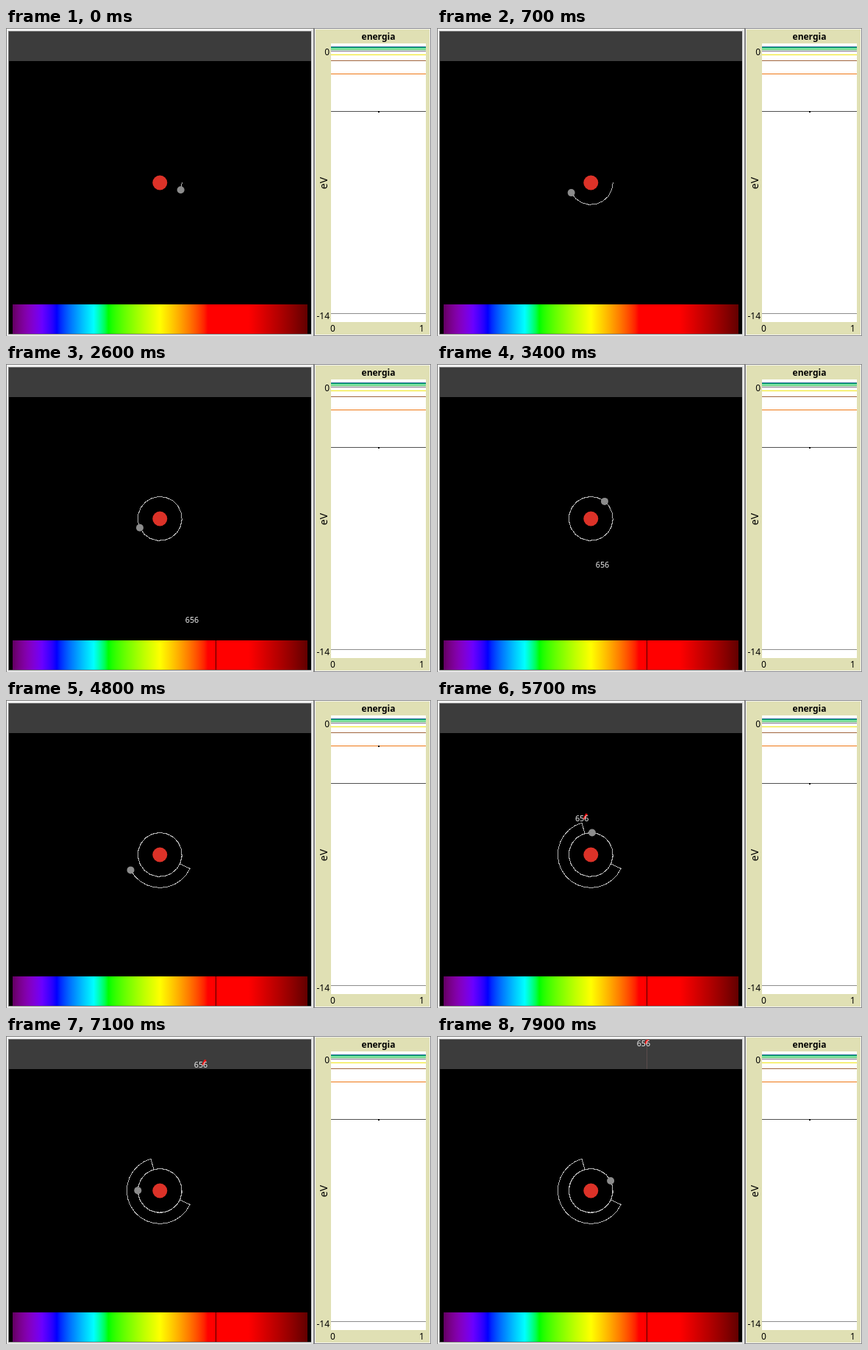
Recreate the animation shown at these times as an HTML page. Size 578x419 px, loop 8 s.

```html
<!DOCTYPE html>
<html lang="it">
<head>
<meta charset="utf-8">
<title>energia</title>
<style>
html, body { margin: 0; width: 100%; height: 100%; overflow: hidden; background: #dcdcdc; }
svg { position: absolute; left: 0; top: 0; display: block; }
text { font-family: "Noto Sans", "Open Sans", sans-serif; font-size: 12px; fill: #000; }
.crisp { shape-rendering: crispEdges; }
#label text { font-size: 10.67px; fill: #f0f0f0; text-anchor: middle; }
</style>
</head>
<body>
<svg width="578" height="419" viewBox="0 0 578 419">
  <defs>
    <linearGradient id="rainbow"></linearGradient>
    <clipPath id="view"><rect x="4" y="5" width="411" height="411"/></clipPath>
  </defs>

  <!-- window frames -->
  <g class="crisp">
    <rect width="578" height="419" fill="#dcdcdc"/>
    <rect width="419" height="1" fill="#828282"/>
    <rect width="1" height="419" fill="#828282"/>
    <rect x="1" y="1" width="417" height="417" fill="#f2f2f2"/>
    <rect x="3" y="4" width="412" height="413" fill="#787878"/>
    <rect x="415" y="3" width="2" height="415" fill="#dcdcdc"/>
    <rect x="418" width="1" height="419" fill="#787878"/>
    <rect x="419" width="159" height="419" fill="#8c8c8c"/>
    <rect x="420" y="1" width="157" height="417" fill="#f2f2f2"/>
    <rect x="421" y="2" width="155" height="415" fill="#e0e0b4"/>
    <rect x="442" y="21" width="129" height="379" fill="#fff"/>
    <g id="levels"></g>
    <rect id="state" x="506" width="2" height="2" fill="#000"/>
  </g>

  <text x="506.500" y="16" text-anchor="middle" font-weight="700">energia</text>
  <text x="440" y="37" text-anchor="end">0</text>
  <text x="440" y="396" text-anchor="end">-14</text>
  <text x="444.500" y="413" text-anchor="middle">0</text>
  <text x="565.500" y="413" text-anchor="middle">1</text>
  <text transform="translate(437 211) rotate(-90)" text-anchor="middle" style="font-size:14px">eV</text>

  <!-- atom view -->
  <g clip-path="url(#view)">
    <g class="crisp">
      <rect x="4" y="5" width="411" height="411" fill="#000"/>
      <rect x="4" y="5" width="411" height="40" fill="#3c3c3c"/>
      <rect x="9" y="376" width="401" height="40" fill="url(#rainbow)"/>
      <rect id="picked" x="285" y="376" width="1" height="40" fill="#500000"/>
      <rect id="detected" x="285" y="5" width="1" height="40" fill="#5a4c4c"/>
    </g>
    <circle cx="209.300" cy="210.500" r="10" fill="#dc3228"/>
    <polyline id="trace" class="crisp" fill="none" stroke="#b4b4b4" stroke-width="1"/>
    <circle id="electron" r="5" fill="#8c8c8c"/>
    <path id="photon" d="M-4 0H4" stroke="#f01414" stroke-width="3" fill="none"/>
    <g id="label"><text y="4">656</text></g>
  </g>
</svg>

<script>
const $ = id => document.getElementById(id);
const STEP = 100, STEPS = 80;
const PICK = 18, ABSORB = 38, EMIT = 56;
const SPEED = 10, LOW = 30, HIGH = 45;
const center = { x: 209.3, y: 210.4 };
const target = { x: 285.5, y: 7 };
const levelY = n => 21.6 + 26.96 * 13.6 / (n * n);

// visible spectrum, wavelength in nm to RGB
function spectral(w) {
  let r = 0, g = 0, b = 0;
  if (w < 440) { r = (440 - w) / 60; b = 1; }
  else if (w < 490) { g = (w - 440) / 50; b = 1; }
  else if (w < 510) { g = 1; b = (510 - w) / 20; }
  else if (w < 580) { r = (w - 510) / 70; g = 1; }
  else if (w < 645) { r = 1; g = (645 - w) / 65; }
  else r = 1;
  const dim = w < 420 ? 0.3 + 0.7 * (w - 380) / 40
            : w > 700 ? 0.3 + 0.7 * (780 - w) / 80 : 1;
  return `rgb(${[r, g, b].map(c => Math.round(255 * (c * dim) ** 0.8))})`;
}

function add(parent, tag, attrs) {
  const el = document.createElementNS("http://www.w3.org/2000/svg", tag);
  for (const k in attrs) el.setAttribute(k, attrs[k]);
  parent.append(el);
}

for (let w = 380; w <= 780; w += 5)
  add($("rainbow"), "stop", { offset: (w - 380) / 400, "stop-color": spectral(w) });

const levelColors = ["#8c8c8c", "#505050", "#f07814", "#a0643c", "#f0e614",
                     "#82788c", "#14b43c", "#00c850", "#28a08c", "#3c78a0"];
levelColors.forEach((fill, i) =>
  add($("levels"), "rect", { x: 442, y: Math.floor(levelY(i + 1)), width: 129, height: 1, fill }));

function polar(angle, r) {
  return { x: center.x + r * Math.cos(angle), y: center.y + r * Math.sin(angle) };
}

// every orbit point; a jump adds a second point at the same angle
const trail = [polar(0, LOW)], lengths = [];
let angle = 0, radius = LOW;
for (let n = 0; n < STEPS; n++) {
  angle += SPEED / radius;
  trail.push(polar(angle, radius));
  if (n === ABSORB || n === EMIT) {
    radius = n === ABSORB ? HIGH : LOW;
    trail.push(polar(angle, radius));
  }
  lengths.push(trail.length);
}

const source = trail[lengths[EMIT] - 2];
const flight = Math.hypot(target.x - source.x, target.y - source.y);
const heading = Math.atan2(target.y - source.y, target.x - source.x);

const show = (id, on) => $(id).setAttribute("visibility", on ? "visible" : "hidden");
const place = (id, x, y, turn = 0) =>
  $(id).setAttribute("transform", `translate(${x} ${y}) rotate(${turn})`);

function draw(n) {
  const path = trail.slice(0, lengths[n]);
  const last = path[path.length - 1];
  $("trace").setAttribute("points", path.map(p => `${p.x.toFixed(2)},${p.y.toFixed(2)}`).join(" "));
  place("electron", last.x, last.y);

  const excited = n >= ABSORB && n < EMIT;
  $("state").setAttribute("y", Math.floor(levelY(excited ? 3 : 2)));

  const incoming = n >= PICK && n < ABSORB;
  const outgoing = n >= EMIT;
  const gone = Math.min(flight, SPEED * (n - EMIT));
  show("picked", n >= PICK);
  show("photon", outgoing);
  show("label", incoming || outgoing);
  show("detected", outgoing && gone === flight);

  if (incoming) {
    place("label", 281 - 3.5 * (n - PICK), 423 - 9.375 * (n - PICK));
  } else if (outgoing) {
    const x = source.x + gone * Math.cos(heading);
    const y = source.y + gone * Math.sin(heading);
    place("photon", x, y, heading * 180 / Math.PI);
    place("label", x - 4.6, y + 2.8);
  }
}

let shown = -1;
const start = performance.now();
function tick() {
  const n = Math.floor((performance.now() - start) / STEP) % STEPS;
  if (n !== shown) draw(shown = n);
  requestAnimationFrame(tick);
}
tick();
</script>
</body>
</html>
```
